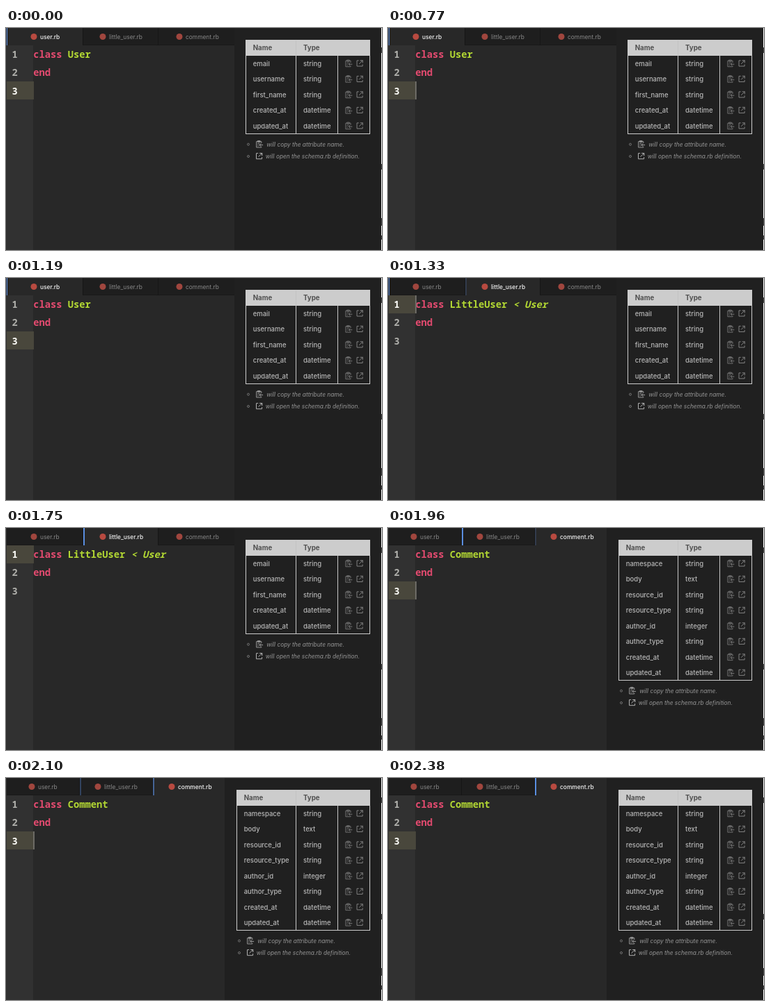
These frames come from a looping animation (540 px wide and 320 px high, 2660 ms). An HTML page with a canvas:

```html
<!DOCTYPE html>
<html lang="en">
<head>
<meta charset="utf-8">
<title>Schema panel</title>
<style>
  html, body { margin: 0; width: 100%; height: 100%; overflow: hidden; background: #202020; }
  canvas { display: block; width: 540px; height: 320px; }
</style>
</head>
<body>
<canvas id="stage"></canvas>
<script>
const W = 540, H = 320, LOOP = 2660, STEP = 70;
const UI = 'Inter, "Open Sans", sans-serif';
const MONO = '"Noto Sans Mono", "DejaVu Sans Mono", monospace';
const PINK = '#e44b70', GREEN = '#b2d733', BLUE = '#5a8ee0';
const ROW = 22.48, TOP = 17, BODY = 40, RIGHT = 522.5, LINE = 26.4;

const canvas = document.getElementById('stage');
const ratio = window.devicePixelRatio || 1;
canvas.width = W * ratio;
canvas.height = H * ratio;
const ctx = canvas.getContext('2d');
ctx.scale(ratio, ratio);

const userRows = [
  ['email', 'string'], ['username', 'string'], ['first_name', 'string'],
  ['created_at', 'datetime'], ['updated_at', 'datetime']
];
const commentRows = [
  ['namespace', 'string'], ['body', 'text'], ['resource_id', 'string'],
  ['resource_type', 'string'], ['author_id', 'integer'], ['author_type', 'string'],
  ['created_at', 'datetime'], ['updated_at', 'datetime']
];

const wide = { edge: 328, tabs: [0, 111, 219], icons: [40, 139, 249], left: 344.5 };
const narrow = { edge: 314, tabs: [0, 106, 211], icons: [37, 132, 238], left: 331.5 };
const titles = ['user.rb', 'little_user.rb', 'comment.rb'];

const scenes = [
  { start: 0, tab: 0, line: 2, name: 'User', layout: wide, rows: userRows, cursor: [770, 1190] },
  { start: 1330, tab: 1, line: 0, name: 'LittleUser', parent: '< User', layout: wide, rows: userRows, cursor: [1330, 1750] },
  { start: 1960, tab: 2, line: 2, name: 'Comment', layout: narrow, rows: commentRows, cursor: [1960, 2380] }
];

function box(x, y, w, h, color) {
  ctx.fillStyle = color;
  ctx.fillRect(x, y, w, h);
}

function label(text, x, y, font, color) {
  ctx.font = font;
  ctx.fillStyle = color;
  ctx.fillText(text, x, y);
}

function stroke(points, color, width = 1) {
  ctx.strokeStyle = color;
  ctx.lineWidth = width;
  ctx.beginPath();
  points.forEach(([x, y], i) => i ? ctx.lineTo(x, y) : ctx.moveTo(x, y));
  ctx.stroke();
}

function dot(x, y, r) {
  ctx.beginPath();
  ctx.arc(x, y, r, 0, Math.PI * 2);
}

function at(x, y, draw) {
  ctx.save();
  ctx.translate(x, y);
  draw();
  ctx.restore();
}

function clipboard(x, y, color) {
  at(x, y, () => {
    stroke([[8, 4.5], [8, 1.7], [.8, 1.7], [.8, 10.2], [8, 10.2], [8, 8.8]], color, .9);
    stroke([[2.6, 2.6], [2.6, .6], [6.2, .6], [6.2, 2.6], [2.6, 2.6]], color, .9);
    stroke([[2.3, 4.6], [5.5, 4.6]], color, .7);
    stroke([[2.3, 6.4], [3.8, 6.4]], color, .7);
    stroke([[2.3, 8.2], [3.8, 8.2]], color, .7);
    stroke([[10.3, 6.7], [5, 6.7]], color);
    stroke([[7, 4.8], [5, 6.7], [7, 8.6]], color);
  });
}

function openLink(x, y, color) {
  at(x, y, () => {
    stroke([[3.4, .9], [.7, .9], [.7, 9], [8.8, 9], [8.8, 6.4]], color);
    stroke([[3.8, 5.9], [8.3, 1.4]], color);
    stroke([[5.4, .8], [8.9, .8], [8.9, 4.3]], color, 1.1);
  });
}

function drawTabs(scene, index, time) {
  const { edge, tabs, icons } = scene.layout;
  const age = Math.floor((time - scene.start) / STEP) * STEP;
  box(0, 0, edge, 25, '#1e1e1e');
  tabs.forEach((x, i) => {
    const active = i === scene.tab;
    const end = i < 2 ? tabs[i + 1] : edge;
    if (active) box(x, 0, end - x, 25, '#282828');
    else box(x, 24, end - x, 1, '#191919');
    if (i) box(x - 1, 0, 1, 25, '#161616');

    let glow = 0;
    if (active) glow = index ? Math.min(1, (age + STEP) / 350) : 1;
    else if (i === scene.tab - 1) glow = Math.max(0, 1 - age / 210);
    ctx.globalAlpha = glow;
    box(x, 0, 2, 25, BLUE);
    ctx.globalAlpha = 1;

    dot(icons[i], 12.5, 4.5);
    ctx.fillStyle = active ? '#b84a40' : '#a0463e';
    ctx.fill();
    const weight = active ? 500 : 400;
    label(titles[i], icons[i] + 9, 15.7, `${weight} 8.4px ${UI}`, active ? '#f4f4f4' : '#888');
  });
}

function drawEditor(scene, time) {
  box(0, 25, scene.layout.edge, H - 25, '#282828');
  box(0, 25, 39, H - 25, '#313131');
  const y = [25, 51, 77][scene.line];
  box(0, y, 40, 26, '#49473c');

  const font = `600 13.75px ${MONO}`;
  for (let i = 0; i < 3; i++) {
    label(i + 1, 8.5, 43 + i * LINE, font, i === scene.line ? '#fafaf5' : '#b0b0ab');
  }
  label('class', 39.2, 43, font, PINK);
  label('end', 39.2, 43 + LINE, font, PINK);
  const advance = ctx.measureText('0').width;
  label(scene.name, 39.2 + 6 * advance, 43, font, GREEN);
  if (scene.parent) {
    const column = 7 + scene.name.length;
    label(scene.parent, 39.2 + column * advance, 43, `italic ${font}`, GREEN);
  }
  const [on, off] = scene.cursor;
  if (time >= on && time < off) box(39, y, 2, 26, '#6c6b65');
}

function drawTable({ layout: { left }, rows }) {
  const bottom = Math.floor(BODY + rows.length * ROW) + .5;
  const textX = left + 10.2;
  box(left, TOP, RIGHT - left, BODY - TOP, '#cccccc');
  label('Name', textX, 32.3, `700 9.7px ${UI}`, '#505050');
  label('Type', 427, 32.3, `700 9.7px ${UI}`, '#505050');

  rows.forEach(([name, type], i) => {
    const mid = BODY + (i + .5) * ROW;
    label(name, textX, mid + 3.5, `500 9.5px ${UI}`, '#b8b8b8');
    label(type, 427, mid + 3.5, `500 9.5px ${UI}`, '#b8b8b8');
    clipboard(487, mid - 5.7, '#777777');
    openLink(503.3, mid - 5.2, '#808080');
  });
  for (const x of [416.5, 476.5]) {
    stroke([[x, BODY], [x, bottom]], '#c8c8c8');
  }
  stroke([[416.5, TOP], [416.5, BODY]], '#c3c3c3');
  ctx.strokeStyle = '#cccccc';
  ctx.strokeRect(left, TOP + .5, RIGHT - left, bottom - TOP - .5);
  return bottom;
}

function drawNotes(left, bottom) {
  const font = `italic 8.3px ${UI}`;
  const first = bottom + 15.2, second = first + 17.3;
  for (const y of [first, second]) {
    dot(left + 3.5, y, 1.5);
    ctx.strokeStyle = '#858585';
    ctx.lineWidth = .8;
    ctx.stroke();
  }
  clipboard(left + 14.3, first - 5.8, '#a0a0a0');
  openLink(left + 14.3, second - 5.3, '#b0b0b0');
  label('will copy the attribute name.', left + 29.8, first + 3, font, '#969696');
  label('will open the schema.rb definition.', left + 28.3, second + 3, font, '#969696');
}

function drawEdges() {
  box(0, 0, 1, H, '#2c2c2c');
  box(539, 0, 1, H, '#ffffff');
  for (const [y, h] of [[28, 8], [196, 8], [274, 11], [299, 6]]) {
    box(539, y, 1, h, '#444444');
  }
}

function frame(now) {
  const time = now % LOOP;
  const index = time >= scenes[2].start ? 2 : time >= scenes[1].start ? 1 : 0;
  const scene = scenes[index];
  box(0, 0, W, H, '#202020');
  drawEditor(scene, time);
  drawTabs(scene, index, time);
  drawNotes(scene.layout.left, drawTable(scene));
  drawEdges();
  requestAnimationFrame(tick);
}

let origin = null;
function tick(now) {
  if (origin === null) origin = now;
  frame(now - origin);
}
requestAnimationFrame(tick);
</script>
</body>
</html>
```
